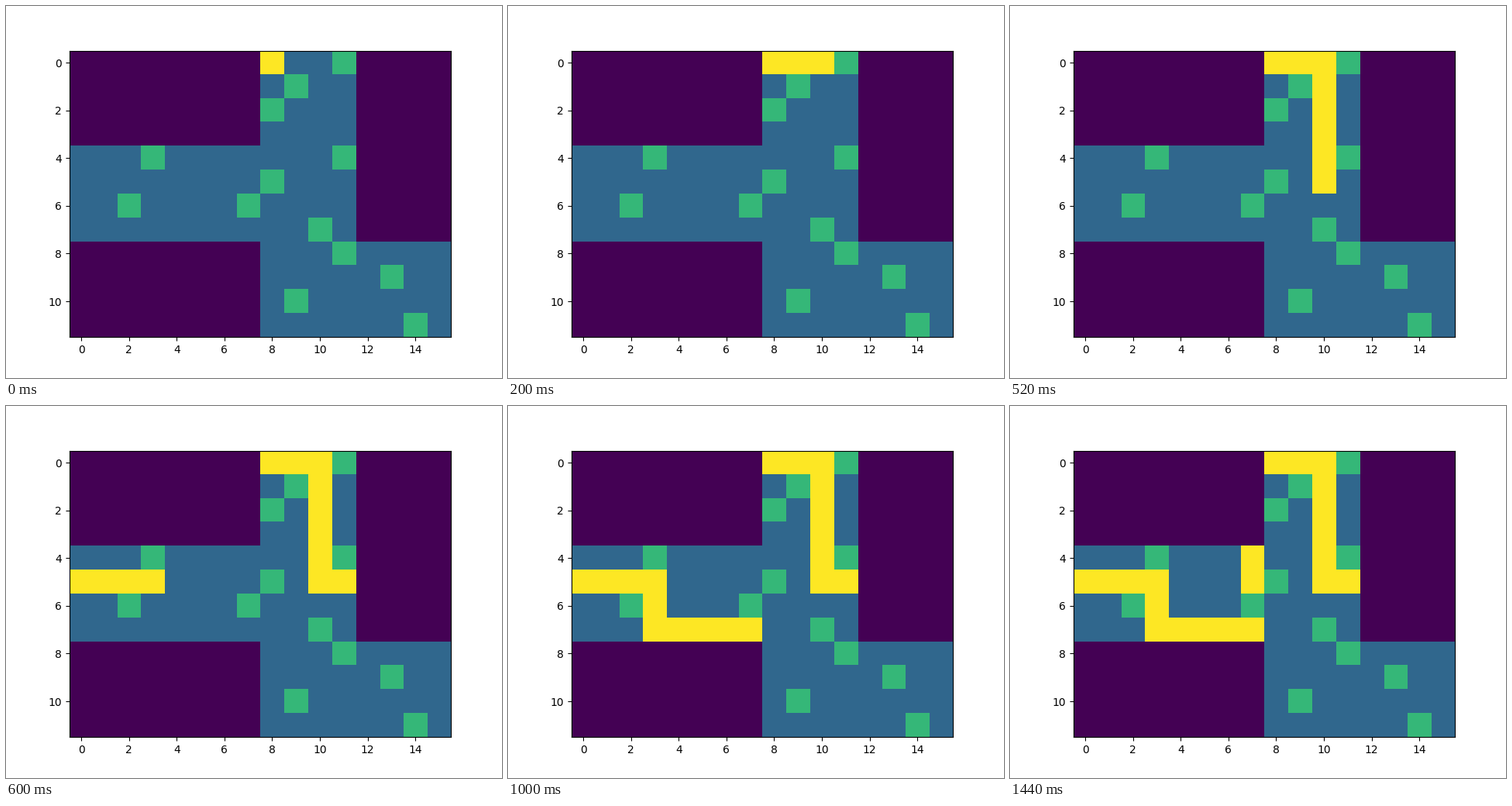
Animation, 640 px wide and 480 px high, one loop 1.6 s. Source, as a matplotlib script:

```python
import matplotlib.pyplot as plt
import numpy as np
from matplotlib.animation import FuncAnimation

VOID, OPEN, WALL, TRAIL = range(4)
FACE = 4  # side of one square region of the map
ROUTE = "10 R 5 L 5 R 10 L 4 R 5 L 5".split()


def make_board():
    board = np.full((3 * FACE, 4 * FACE), VOID)
    board[:, 2 * FACE:3 * FACE] = OPEN
    board[FACE:2 * FACE, :2 * FACE] = OPEN
    board[2 * FACE:, 3 * FACE:] = OPEN
    # One wall in every row but the fourth, and two more in the left arm.
    rows = np.delete(np.arange(len(board)), 3)
    board[rows, [11, 9, 8, 11, 8, 7, 10, 11, 13, 9, 14]] = WALL
    board[[4, 6], [3, 2]] = WALL
    return board


def next_cell(board, cell, heading):
    """Step once, wrapping around the edges and across the void."""
    while True:
        cell = tuple((c + d) % n for c, d, n in zip(cell, heading, board.shape))
        if board[cell] != VOID:
            return cell


def walk(board, cell, heading, steps):
    """Mark the trail until the steps run out or a wall blocks the way."""
    for _ in range(steps):
        ahead = next_cell(board, cell, heading)
        if board[ahead] == WALL:
            break
        cell = ahead
        board[cell] = TRAIL
    return cell


def board_after(move_count):
    board = make_board()
    cell, (dy, dx) = (0, 2 * FACE), (0, 1)
    board[cell] = TRAIL
    for token in ROUTE[:2 * move_count]:
        if token == "R":
            dy, dx = dx, -dy
        elif token == "L":
            dy, dx = -dx, dy
        else:
            cell = walk(board, cell, (dy, dx), int(token))
    return board


fig, ax = plt.subplots(figsize=(6.4, 4.8), dpi=100)
image = ax.imshow(board_after(0), vmin=VOID, vmax=TRAIL, cmap="viridis")


def update(frame):
    image.set_data(board_after(frame))
    return [image]


move_total = len(ROUTE[::2])
anim = FuncAnimation(fig, update, frames=move_total + 1, interval=200, repeat=True)
plt.show()
```
